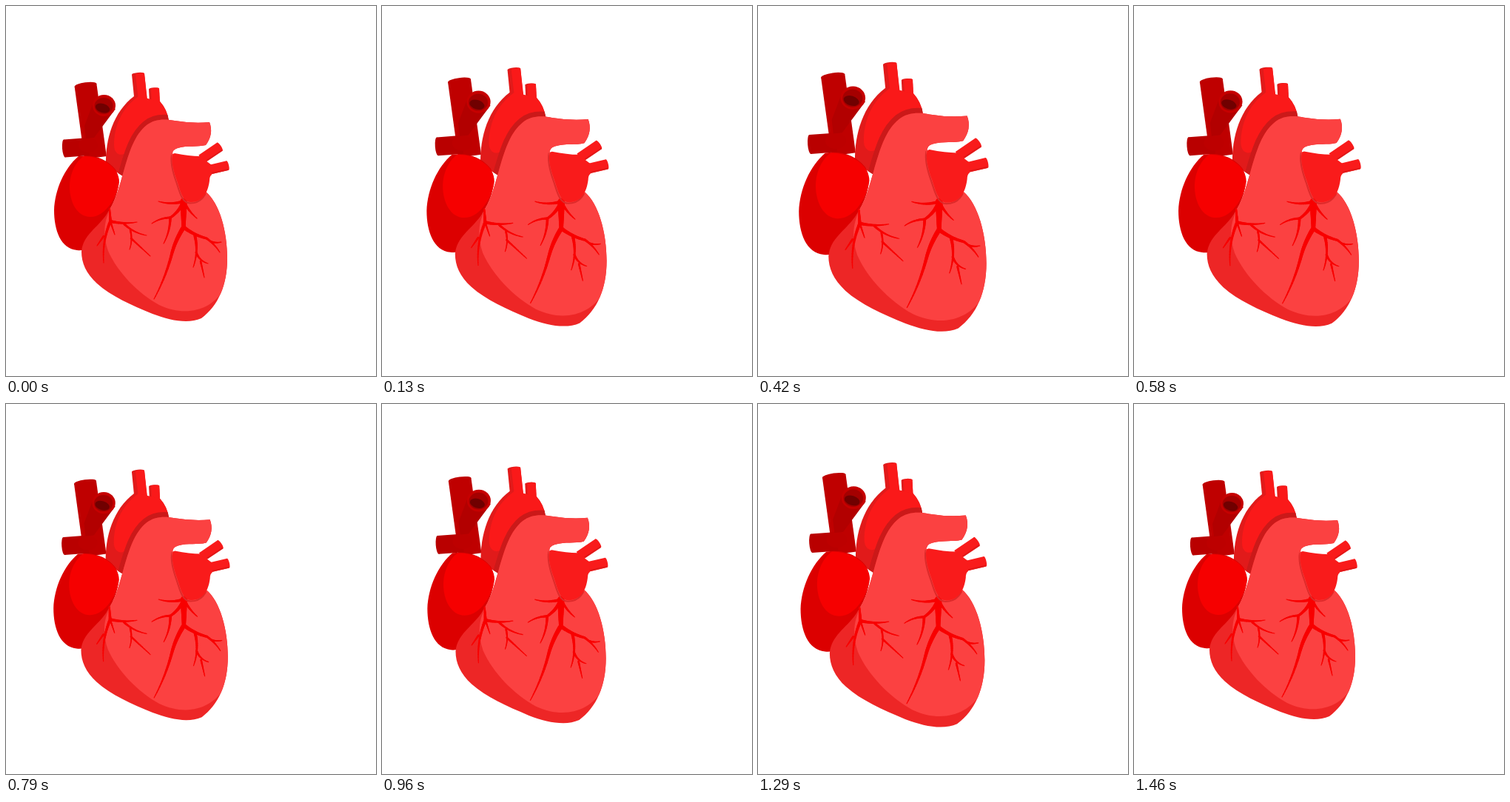
Animation, 500 px wide and 500 px high, one loop 1.5 s. Source, as an HTML page with a canvas:

```html
<!DOCTYPE html>
<html lang="en">
<head>
<meta charset="utf-8">
<title>Beating heart</title>
<style>
  html, body { margin: 0; width: 100%; height: 100%; overflow: hidden; background: #fff; }
  canvas { display: block; width: 500px; height: 500px; }
</style>
</head>
<body>
<canvas id="stage" width="500" height="500"></canvas>
<script>
const ctx = document.getElementById('stage').getContext('2d');
const LOOP = 1500, STEPS = 36;
const CENTER = { x: 183, y: 258.5 };

// [step, swell]: swell 1 enlarges the heart by a tenth
const BEAT = [[0, 0], [7, 1], [14, .42], [19, .07], [20, .05], [23, .31], [26, .78], [28.2, 1], [35, 0], [36, 0]];

const slope = i => (BEAT[i + 1][1] - BEAT[i][1]) / (BEAT[i + 1][0] - BEAT[i][0]);

function tangent(i) {
  if (i === 0 || i === BEAT.length - 1) return 0;
  const a = slope(i - 1), b = slope(i);
  return a * b > 0 ? 2 * a * b / (a + b) : 0;
}

// Monotone cubic through the beat keys
function swell(step) {
  let i = 0;
  while (i < BEAT.length - 2 && BEAT[i + 1][0] <= step) i++;
  const [x0, y0] = BEAT[i], [x1, y1] = BEAT[i + 1];
  const h = x1 - x0, u = (step - x0) / h, v = 1 - u;
  return v * v * (1 + 2 * u) * y0 + u * u * (3 - 2 * u) * y1
    + h * u * v * (v * tangent(i) - u * tangent(i + 1));
}

const ventricle = new Path2D('M275 157Q281 173 270 188C258 191 246 188 232 192Q224 194 225 202L240 255L270 251' +
  'C289 267 299 305 299 341S287 405 264 422C246 430 222 425 198 416C169 404 142 392 123 375' +
  'C108 361 102 347 102 332C104 310 122 301 135 283S152 247 158 227C167 195 174 174 190 161' +
  'C200 153 214 152 228 155Q252 159 275 157Z');

const aorta = new Path2D('M173 122L208 129Q218 140 220 155L158 230L135 215C134 180 145 143 173 122Z');

const auricle = new Path2D('M228 199Q248 203 262 203L278 215V228Q275 230 275 236C273 252 266 265 250 265' +
  'C238 265 235 247 231 236C226 222 223 210 225 200Z');

function fill(color, path) {
  ctx.fillStyle = color;
  ctx.fill(typeof path === 'string' ? new Path2D(path) : path);
}

function oval(color, x, y, rx, ry, turn = 0) {
  ctx.fillStyle = color;
  ctx.beginPath();
  ctx.ellipse(x, y, rx, ry, turn, 0, 2 * Math.PI);
  ctx.fill();
}

// Straight vessel with a rounded mouth at its first end
function tube(color, width, x0, y0, x1, y1) {
  ctx.strokeStyle = color;
  ctx.lineWidth = width;
  ctx.lineCap = 'butt';
  ctx.beginPath();
  ctx.moveTo(x0, y0);
  ctx.lineTo(x1, y1);
  ctx.stroke();
  oval(color, x0, y0, width / 8, width / 2, Math.atan2(y1 - y0, x1 - x0));
}

// Edge shade of one part, visible only on another
function shade(color, width, edge, area) {
  ctx.save();
  ctx.clip(area);
  ctx.strokeStyle = color;
  ctx.lineWidth = width;
  ctx.stroke(edge);
  ctx.restore();
}

// Tapering bow between two points
function vein(width, [x0, y0], [x1, y1], bend = 0, tip = 1) {
  const cx = (x0 + x1) / 2 - bend * (y1 - y0), cy = (y0 + y1) / 2 + bend * (x1 - x0);
  const at = (a, b, c, u) => (1 - u) ** 2 * a + 2 * u * (1 - u) * b + u * u * c;
  const n = 16;
  ctx.strokeStyle = '#f80000';
  ctx.lineCap = 'round';
  for (let k = 0; k < n; k++) {
    ctx.lineWidth = width + (tip - width) * k / n;
    ctx.beginPath();
    for (const u of [k / n, (k + 1) / n]) ctx.lineTo(at(x0, cx, x1, u), at(y0, cy, y1, u));
    ctx.stroke();
  }
}

function drawVenaCava() {
  tube('#bf0000', 30, 107.5, 107, 121, 205);
  tube('#b90000', 24, 79, 192.5, 112, 190);
  oval('#bd0000', 111, 188, 13, 10);
  fill('#b20000', 'M117 133L106 162L108 179L119 178L148 139Z');
  oval('#c60000', 132.5, 134.5, 15.5, 14.5);
  oval('#a40000', 132, 135, 12.5, 11);
  oval('#700000', 130.5, 138, 10, 6, .3);
}

function drawAorta() {
  tube('#e11a1a', 17, 178.5, 92, 182, 127);
  tube('#e11a1a', 14, 200, 112, 201, 132);
  fill('#e11a1a', aorta);
  tube('#fa1919', 12, 181, 92, 185, 127);
  tube('#fa1919', 11, 201.5, 112, 202.5, 132);
  fill('#fa1919', 'M179 122L208 129Q217 139 219 152C190 153 179 182 165 196C157 205 146 201 146 188C146 164 155 139 179 122Z');
  shade('#cb1919', 13, ventricle, aorta);
}

function drawAtrium() {
  fill('#dc0000', 'M98 203Q130 199 148 221Q158 238 144 268L112 327Q105 331 96 330C74 328 65 303 65 276C66 248 79 219 98 203Z');
  fill('#f60000', 'M105 203C130 203 153 218 153 238C151 255 136 285 114 285C96 285 86 265 86 244C86 227 94 210 105 203Z');
}

function drawVentricle() {
  fill('#ed2626', ventricle);
  ctx.save();
  ctx.clip(ventricle);
  fill('#fb4141', 'M141 274C133 290 130 308 138 331C151 360 178 388 207 404C243 421 278 411 294 383L320 330V140H130Z');
  ctx.restore();
}

function drawRightVeins() {
  const root = [240, 264], fork = [240, 299], elbow = [222, 286], bow = [224, 335], split = [271, 314];
  vein(9, root, fork, 0, 5);
  vein(6, fork, bow, .08, 4);
  vein(4, bow, [200, 396], -.06);
  vein(4, root, [206, 264], -.15);
  vein(5, root, elbow, -.15, 3);
  vein(3, elbow, [197, 294], .15);
  vein(3.5, elbow, [213, 321], -.12);
  vein(4, root, [258, 287], .1);
  vein(5, fork, split, .1, 3);
  vein(3, split, [289, 333], -.1);
  vein(2.5, [276, 318], [291, 319], .15);
  vein(4, [255, 309], [253, 353], -.15);
  vein(3, [257, 333], [273, 348], .25);
  vein(2.5, [263, 345], [268, 367]);
}

function drawLeftVeins() {
  const knot = [141, 291];
  vein(2, [140, 274], knot, 0, 4);
  vein(4, knot, [177, 292], .1);
  vein(3, [159, 294], [190, 310], .15);
  vein(2.5, [168, 303], [167, 329], -.15);
  vein(2.5, [169, 314], [195, 338]);
  vein(4, knot, [132, 347], .12);
  vein(2.5, [132, 311], [123, 324]);
  vein(2.5, knot, [147, 309]);
}

function drawAuricle() {
  const red = '#f91b1b', fold = '#e21818';
  ctx.save();
  ctx.translate(-1, 1.5);
  shade('#de2a2a', 2, auricle, ventricle);
  ctx.restore();
  tube(red, 13, 289, 190, 264, 207);
  tube(red, 13, 299.5, 215.5, 272, 222);
  fill(red, auricle);
  tube(fold, 2, 292, 195, 271, 209);
  tube(fold, 2, 300, 221, 278, 226);
}

function frame(now) {
  const step = Math.floor((now % LOOP + 4) * STEPS / LOOP) % STEPS;
  const scale = 1 + .1 * swell(step);
  ctx.setTransform(1, 0, 0, 1, 0, 0);
  ctx.fillStyle = '#fff';
  ctx.fillRect(0, 0, 500, 500);
  ctx.translate(CENTER.x, CENTER.y);
  ctx.scale(scale, scale);
  ctx.translate(-CENTER.x, -CENTER.y);
  drawVenaCava();
  drawAorta();
  drawAtrium();
  drawVentricle();
  drawLeftVeins();
  drawRightVeins();
  drawAuricle();
  requestAnimationFrame(frame);
}
requestAnimationFrame(frame);
</script>
</body>
</html>
```
